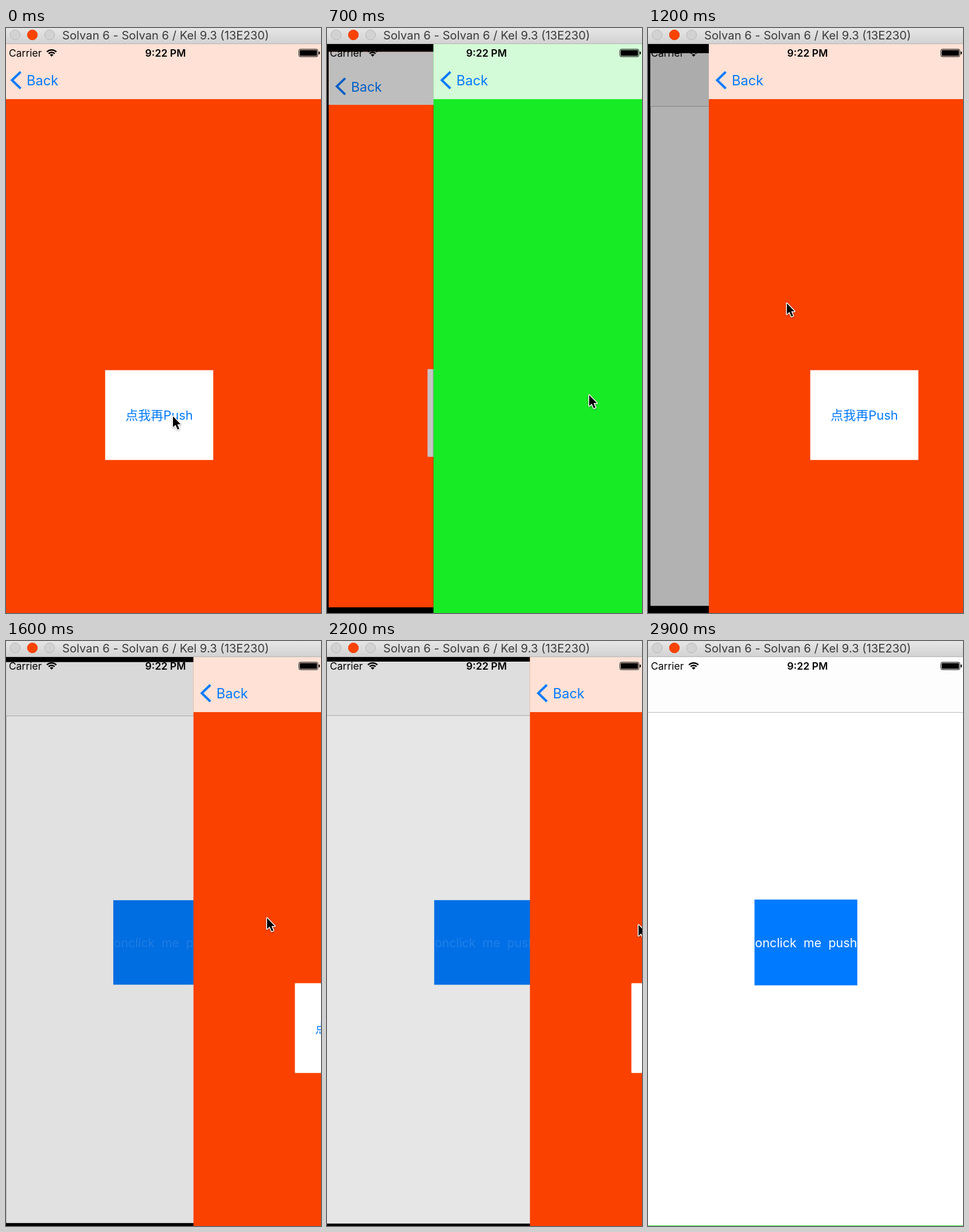
An HTML page with a canvas for the animation above (3000 ms loop, 549 by 1020 pixels).

```html
<!DOCTYPE html>
<html lang="en">
<head>
<meta charset="utf-8">
<title>Swipe back</title>
<style>
html, body { margin: 0; width: 549px; height: 1020px; overflow: hidden; background: #000; }
canvas { display: block; }
</style>
</head>
<body>
<canvas width="549" height="1020"></canvas>
<script>
const g = document.querySelector('canvas').getContext('2d');
const SANS = 'Inter, "Noto Sans CJK SC", "Noto Sans CJK", sans-serif';
const BLUE = '#007aff', LEFT = -4, WIDTH = 558, BOTTOM = 1022.4;
const CENTER = [275, 525.7];
const CARD = [172.8, 596.6, 188.4, 156.6];
const HOME = 0, ORANGE = 1, GREEN = 2;
const LOOP = 3000, STEP = 100;

// step, top page, its offset, pointer x, pointer y
const KEYS = [
  [0, ORANGE, 0, 290, 676],
  [1, GREEN, 440, 290, 676],
  [2, GREEN, 120, 290, 676],
  [3, GREEN, 0, 290, 676],
  [4, GREEN, 0, 285, 655],
  [7, GREEN, 189.6, 456, 639],
  [9, GREEN, 480, 540, 610],
  [10, ORANGE, 0, 340, 545],
  [11, ORANGE, 0, 131, 480],
  [12, ORANGE, 110, 241, 479],
  [15, ORANGE, 335, 458, 481],
  [16, ORANGE, 330.7, 454, 482],
  [18, ORANGE, 62.7, 180, 482],
  [19, ORANGE, 90, 215, 484],
  [22, ORANGE, 357.7, 542, 494],
  [23, ORANGE, 500, 600, 496],
  [24, HOME, 0, 600, 500],
  [30, HOME, 0, 600, 500]
];

function rect(x, y, w, h, color) {
  g.fillStyle = color;
  g.fillRect(x, y, w, h);
}

function text(str, x, y, size, color, weight = 400, align = 'left') {
  g.font = `${weight} ${size}px ${SANS}`;
  g.textAlign = align;
  g.fillStyle = color;
  g.fillText(str, x, y);
}

function poly(points, close) {
  g.beginPath();
  points.forEach(([x, y]) => g.lineTo(x, y));
  if (close) g.closePath();
}

function disc(x, y, r, color, edge) {
  g.beginPath();
  g.arc(x, y, r, 0, Math.PI * 2);
  g.fillStyle = color;
  g.fill();
  g.lineWidth = 1;
  g.strokeStyle = edge;
  g.stroke();
}

function page(kind, dim = 0) {
  const top = dim ? 29.3 : 28;
  const shade = `rgba(0,0,0,${dim})`;
  const body = ['#fff', '#fa4100', '#17eb25'][kind];
  const nav = dim ? '#f6f6f6' : ['#fdfdfd', '#ffe1d5', '#d4fbd7'][kind];
  rect(LEFT, top, WIDTH, BOTTOM - top, body);
  rect(LEFT, top, WIDTH, 124 - top, nav);

  if (kind === HOME) {
    rect(LEFT, 124, WIDTH, 1, '#b8b8b8');
    rect(185.6, 450.8, 179.2, 149.6, '#007bff');
    text('onclick  me  push', 186.5, 534, 21.5, dim ? 'rgba(255,255,255,.14)' : '#fff');
    if (dim) rect(LEFT, top, WIDTH, BOTTOM - top, shade);
    else rect(LEFT, 1019, WIDTH, 1, '#2fd23a');
    return;
  }

  poly([[25.5, 76.5], [10.5, 91], [25.5, 105.5]]);
  g.lineWidth = 4;
  g.strokeStyle = BLUE;
  g.stroke();
  text('Back', 36, 100, 23.6, BLUE);
  if (kind === ORANGE) {
    rect(...CARD, '#fff');
    text('点我再Push', 267, 683, 22, BLUE, 400, 'center');
  }
  // the vivid page colour keeps its brightness under the shade
  if (dim) {
    rect(LEFT, top, WIDTH, 124 - top, shade);
    rect(...CARD, shade);
  }
}

function underPage(kind, offset, pushing) {
  const far = 1 - offset / WIDTH;
  const [cx, cy] = CENTER;
  g.save();
  if (pushing) {
    g.translate(-WIDTH * .3 * far, 0);
    page(kind);
  } else {
    const scale = 1 - .0375 * far;
    g.translate(cx, cy);
    g.scale(scale, scale);
    g.translate(-cx, -cy);
    page(kind, .41 * far ** 1.4);
  }
  g.restore();
}

function statusBar() {
  text('Carrier', 5, 50, 17.5, '#000');
  text('9:22 PM', 278, 50, 17.6, '#000', 600, 'center');

  const a = -Math.PI * .75, b = -Math.PI * .25;
  g.strokeStyle = g.fillStyle = '#000';
  g.lineWidth = 2.5;
  for (const r of [11.7, 7.5]) {
    g.beginPath();
    g.arc(79.5, 50, r, a, b);
    g.stroke();
  }
  g.beginPath();
  g.moveTo(79.5, 50);
  g.arc(79.5, 50, 4.5, a, b);
  g.fill();

  g.lineWidth = 1;
  g.beginPath();
  g.roundRect(510.5, 37, 33, 13, 2.5);
  g.stroke();
  g.beginPath();
  g.roundRect(512, 38.5, 30, 10, 1);
  g.roundRect(545, 41, 2, 5, 1);
  g.fill();
}

function titleBar() {
  const fade = g.createLinearGradient(0, 0, 0, 27);
  fade.addColorStop(0, '#e6e6e6');
  fade.addColorStop(1, '#d2d2d2');
  rect(0, 0, 549, 27, fade);
  rect(0, 27, 549, 1, '#b4b4b4');
  disc(16, 12, 8.7, '#d2d2d2', '#b8b8b8');
  disc(46, 12, 8.7, '#fc4400', '#f04000');
  disc(76, 12, 8.7, '#d2d2d2', '#b8b8b8');
  text('Solvan 6 - Solvan 6 / Kel 9.3 (13E230)', 98, 19.5, 20.2, '#3a3a3a');
}

function pointer(x, y) {
  g.save();
  g.translate(x + 1, y + 1);
  poly([[0, 0], [0, 19], [4.4, 15], [8, 23], [11, 21.7], [7.6, 14], [13.4, 14]], true);
  g.shadowColor = 'rgba(0,0,0,.35)';
  g.shadowBlur = 3;
  g.shadowOffsetY = 1;
  g.lineJoin = 'round';
  g.lineWidth = 3;
  g.strokeStyle = '#fff';
  g.stroke();
  g.shadowColor = 'transparent';
  g.fillStyle = '#000';
  g.fill();
  g.restore();
}

function pose(step) {
  const i = KEYS.findLastIndex(k => k[0] <= step);
  const from = KEYS[i], to = KEYS[i + 1];
  const p = (step - from[0]) / (to[0] - from[0]);
  return from.map((v, n) => n === 1 ? v : v + (to[n] - v) * p);
}

function draw(now) {
  const [step, kind, offset, x, y] = pose(Math.floor(now % LOOP / STEP));
  rect(0, 0, 549, 1020, '#000');
  if (offset) {
    underPage(kind - 1, offset, step < 4);
    if (kind === GREEN) rect(offset + LEFT - 1, 134, 1, 876, 'rgba(0,0,0,.3)');
  }
  g.save();
  g.translate(offset, 0);
  page(kind);
  g.restore();
  statusBar();
  titleBar();
  pointer(x, y);
}

const start = performance.now();
function tick() {
  draw(performance.now() - start);
  requestAnimationFrame(tick);
}
tick();
</script>
</body>
</html>
```
